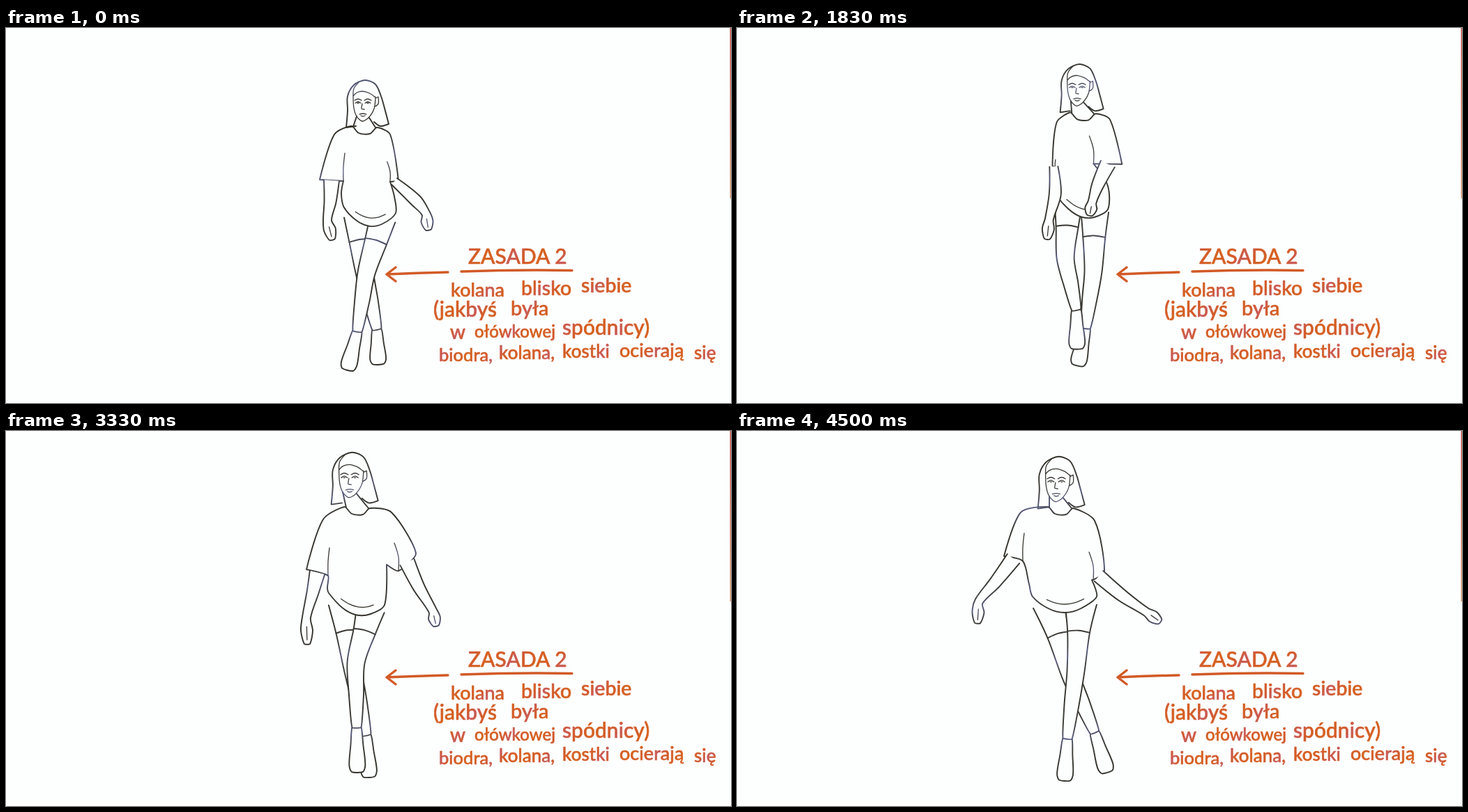
Animation, 1040 px wide and 539 px high, one loop 4670 ms. Source, as an HTML page:

```html
<!DOCTYPE html>
<html lang="pl">
<head>
<meta charset="utf-8">
<title>Zasada 2</title>
<style>
html, body { margin: 0; height: 100%; overflow: hidden; background: #fdfefe; }
svg { display: block; width: 100vw; height: 100vh; }
text { font-family: Lato, "Open Sans", sans-serif; font-weight: 500; fill: url(#ink); stroke: url(#ink); stroke-width: .6; }
path { fill: none; stroke-linecap: round; stroke-linejoin: round; }
#figure path { stroke: url(#pencil); stroke-width: 1.9; }
#figure .solid { fill: #fdfefe; }
#figure .thin { stroke-width: 1.3; }
</style>
</head>
<body>
<svg viewBox="0 0 1040 539">
  <defs>
    <linearGradient id="pencil" gradientUnits="userSpaceOnUse" x1="400" y1="60" x2="418" y2="112" spreadMethod="reflect">
      <stop offset="0" stop-color="#32322a"/><stop offset=".7" stop-color="#3d3d3a"/><stop offset="1" stop-color="#555a7c"/>
    </linearGradient>
    <linearGradient id="ink" gradientUnits="userSpaceOnUse" x1="620" y1="320" x2="645" y2="338" spreadMethod="reflect">
      <stop offset="0" stop-color="#d6611f"/><stop offset=".7" stop-color="#d25a2c"/><stop offset="1" stop-color="#c85a58"/>
    </linearGradient>
    <linearGradient id="edge" x2="0" y2="1">
      <stop offset="0" stop-color="#c8564e"/><stop offset="1" stop-color="#dca078"/>
    </linearGradient>
  </defs>
  <rect x="1038.5" width="1.5" height="245" fill="url(#edge)"/>
  <g id="figure"></g>
  <path d="M634 351Q590 352 546 354M559 344L546 354L559 364M653 350Q735 347 812 348.5" stroke="#d25a26" stroke-width="3.4"/>
  <g id="note"></g>
</svg>
<script>
const words = [
  ['ZASADA 2', 663, 339, 30],
  ['kolana', 638, 386, 27], ['blisko', 739, 384, 28.5], ['siebie', 825, 380, 28.5],
  ['(jakbyś', 613, 415, 30], ['była', 724, 413, 29],
  ['w', 637, 447, 28], ['ołówkowej', 672, 445, 24], ['spódnicy)', 798, 441, 30],
  ['biodra,', 621, 479, 25.5], ['kolana,', 707, 476, 26], ['kostki', 798, 474, 26],
  ['ocierają', 880, 473, 27], ['się', 987, 476, 26]
];
note.innerHTML = words.map(([s, x, y, size]) =>
  `<text x="${x}" y="${y}" font-size="${size}">${s}</text>`).join('');

// Joints as x,y pairs. Sleeves: outer and inner end. Arms: elbow, wrist, tip.
// Legs: knee, ankle, toe; A hangs on screen left, B on screen right.
const poses = [
  { step: 0, front: 'B', head: [512, 107, 1], neck: [514, 142], shoulders: [471, 153, 551, 153],
    sleeveL: [450, 218, 484, 220], sleeveR: [563, 220, 551, 221], waist: [481, 238, 557, 242], hem: [485, 258, 559, 266],
    armL: [465, 250, 461, 276, 468, 304], armR: [588, 248, 602, 266, 606, 290],
    legA: [515, 355, 532, 433, 534, 483], legB: [517, 352, 504, 436, 490, 491] },
  { step: 4, front: 'B', head: [498, 100, 1], neck: [502, 135], shoulders: [455, 140, 546, 152],
    sleeveL: [430, 206, 451, 210], sleeveR: [555, 213, 542, 222], waist: [462, 234, 540, 230], hem: [464, 250, 543, 247],
    armL: [430, 240, 413, 270, 414, 293], armR: [585, 228, 616, 232, 632, 250],
    legA: [501, 355, 518, 425, 531, 477], legB: [515, 345, 500, 434, 489, 487] },
  { step: 8, front: 'A', head: [488, 85, 1], neck: [492, 124], shoulders: [453, 128, 527, 138],
    sleeveL: [443, 196, 449, 198], sleeveR: [548, 206, 505, 205], waist: [450, 222, 515, 235], hem: [453, 239, 530, 257],
    armL: [446, 230, 438, 262, 435, 292], armR: [524, 230, 531, 250, 529, 267],
    legA: [457, 318, 468, 381, 469, 435], legB: [511, 350, 502, 430, 488, 483] },
  { step: 15, front: 'A', behind: 'L', head: [488, 84, 1.04], neck: [502, 120], shoulders: [466, 146, 545, 122],
    sleeveL: [465, 200, 466, 204], sleeveR: [558, 182, 520, 182], waist: [460, 215, 554, 215], hem: [461, 234, 535, 265],
    armL: [470, 250, 461, 292, 458, 318], armR: [508, 222, 481, 250, 475, 272],
    legA: [490, 348, 512, 437, 513, 495], legB: [511, 350, 498, 433, 490, 487] },
  { step: 20, front: 'B', head: [493, 66, 1.1], neck: [504, 110], shoulders: [455, 127, 553, 117],
    sleeveL: [431, 199, 462, 208], sleeveR: [588, 176, 563, 201], waist: [461, 226, 546, 192], hem: [463, 233, 543, 250],
    armL: [440, 232, 431, 268, 432, 306], armR: [592, 224, 612, 258, 617, 280],
    legA: [498, 345, 517, 437, 521, 497], legB: [502, 333, 503, 426, 504, 490] },
  { step: 24, front: 'B', behind: 'R', head: [478, 69, 1.1], neck: [486, 110], shoulders: [429, 121, 532, 122],
    sleeveL: [413, 195, 437, 201], sleeveR: [543, 195, 534, 201], waist: [448, 219, 536, 215], hem: [452, 233, 540, 238],
    armL: [419, 235, 412, 275, 417, 306], armR: [536, 235, 544, 275, 542, 307],
    legA: [492, 345, 523, 435, 526, 491], legB: [498, 337, 473, 441, 465, 503] },
  { step: 27, front: 'B', head: [458, 72, 1.1], neck: [464, 110], shoulders: [407, 117, 513, 129],
    sleeveL: [383, 180, 410, 187], sleeveR: [527, 203, 511, 214], waist: [419, 220, 509, 214], hem: [424, 238, 516, 238],
    armL: [370, 218, 347, 245, 345, 276], armR: [553, 237, 587, 260, 607, 274],
    legA: [480, 355, 513, 433, 531, 490], legB: [486, 345, 474, 442, 470, 502] }
];

// Head strokes around the point between the eyes.
const hair = [-10, 34, -24, 36, -22, 12, -22, -9, -13, -25, 3, -32, 18, -26, 26, -9, 32, 12, 37, 31, 25, 34, 16, 28];
const face = [
  [-14, -9, -13, 8, -9, 20, -1, 27, 8, 22, 16, 9, 18, -8],
  [-6, -29, -13, -20, -14, -9, -9, -14, 0, -16, 10, -13, 17, -8],
  [18, -6, 22, -8, 22, 2, 17, 6],
  [-1, 2, -2, 9, 2, 10],
  [-5, 17, 0, 16, 5, 17], [-3, 19, 0, 20, 3, 19]
];
for (const x of [-7, 7])
  face.push([x - 5, -3, x, -5, x + 5, -3], [x - 4, 1, x, -1, x + 4, 1], [x - 1, 1, x + 1, 1]);

const pairs = a => a.flatMap((x, i) => i % 2 ? [] : [[x, a[i + 1]]]);
const mix = (a, b, k) => a.map((v, i) => v + (b[i] - v) * k);
const shift = (a, x, y) => [a[0] + x, a[1] + y];
const dist = (a, b) => Math.hypot(b[0] - a[0], b[1] - a[1]);

// Smooth curve through points; sharp turns stay corners.
function curve(p, closed) {
  const n = p.length;
  const at = i => p[closed ? (i + n) % n : Math.min(n - 1, Math.max(0, i))];
  const tangent = i => {
    const [a, b, c] = [at(i - 1), at(i), at(i + 1)];
    const dot = (b[0] - a[0]) * (c[0] - b[0]) + (b[1] - a[1]) * (c[1] - b[1]);
    const cos = dot / (dist(a, b) * dist(b, c) || 1);
    const k = Math.sqrt(Math.max(0, cos)) / 3 / (dist(a, c) || 1);
    return [(c[0] - a[0]) * k, (c[1] - a[1]) * k];
  };
  let d = 'M' + p[0];
  for (let i = 0; i < (closed ? n : n - 1); i++) {
    const a = at(i), b = at(i + 1), ta = tangent(i), tb = tangent(i + 1), len = dist(a, b);
    d += `C${shift(a, ta[0] * len, ta[1] * len)} ${shift(b, -tb[0] * len, -tb[1] * len)} ${b}`;
  }
  return d;
}

const path = (d, type = '') => `<path class="${type}" d="${d}"/>`;

// Outline of a tapered limb: down one side, back up the other.
function limb(joints, widths) {
  const side = sign => joints.map((p, i) => {
    const a = joints[Math.max(0, i - 1)], b = joints[Math.min(joints.length - 1, i + 1)];
    const k = sign * widths[i] / (dist(a, b) || 1);
    return shift(p, (a[1] - b[1]) * k, (b[0] - a[0]) * k);
  });
  return [...side(1), ...side(-1).reverse()];
}

// Part of a sagging line between two points.
const sag = ([a, b], from, to, depth, lift = 0) => [0, .25, .5, .75, 1].map(s => {
  const u = from + (to - from) * s;
  return shift(mix(a, b, u), 0, 4 * depth * u * (1 - u) - lift);
});

function arm(pose, side) {
  const [outer, inner] = pairs(pose['sleeve' + side]);
  const [elbow, wrist, tip] = pairs(pose['arm' + side]);
  const top = Math.min(11, Math.max(6, dist(outer, inner) / 2));
  const joints = [mix(outer, inner, .5), elbow, wrist, mix(wrist, tip, .5), tip];
  return path(curve(limb(joints, [top, 8.5, 6, 8.5, 4])), 'solid') +
    path(curve([mix(wrist, tip, .35), mix(wrist, tip, .85)]), 'thin');
}

function leg(pose, side) {
  const hem = pairs(pose.hem), [knee, ankle, toe] = pairs(pose['leg' + side]);
  const hip = shift(mix(...hem, side === 'A' ? .25 : .75), 0, 10);
  const cuff = mix(hip, knee, .42);
  const outline = limb([hip, cuff, knee, mix(knee, ankle, .5), ankle], [dist(...hem) / 4, 16, 12.5, 10.5, 6.5]);
  const foot = limb([ankle, mix(ankle, toe, .4), mix(ankle, toe, .85), toe], [6.5, 9, 11.5, 8]);
  return path(curve(foot, true), 'solid') + path(curve(outline), 'solid') +
    path(curve([outline[1], shift(cuff, 0, -2), outline[8]]));
}

function shirt(pose) {
  const [outL, inL] = pairs(pose.sleeveL), [outR, inR] = pairs(pose.sleeveR);
  const [shoulderL, shoulderR] = pairs(pose.shoulders), [waistL, waistR] = pairs(pose.waist);
  const hem = pairs(pose.hem), at = (x, y) => shift(pose.neck, x, y);
  const outline = [at(-18, -1), shoulderL, outL, inL, waistL, ...sag(hem, 0, 1, 23),
    waistR, inR, outR, shoulderR, at(18, 1), at(8, 10), at(-8, 9)];
  const fold = (inner, outer, lean) => {
    const rise = Math.min(40, 2.4 * dist(inner, outer));
    return curve([inner, shift(inner, 0, -rise / 2), shift(inner, lean * rise, -rise)]);
  };
  return path(curve(outline, true), 'solid') +
    path(fold(inL, outL, .05) + fold(inR, outR, -.15) + curve(sag(hem, .22, .8, 21, 10)), 'thin');
}

function head(pose) {
  const [x, y, size] = pose.head;
  const place = a => pairs(a).map(p => [x + p[0] * size, y + p[1] * size]);
  const jaw = place([-9, 20, 9, 22]);
  const neck = `M${jaw[0]}L${shift(pose.neck, -16, 0)}M${jaw[1]}L${shift(pose.neck, 16, 1)}`;
  return path(neck + curve(place(hair))) + path(face.map(a => curve(place(a))).join(''), 'thin');
}

function blend(step) {
  const i = Math.max(0, poses.findIndex(p => p.step >= step) - 1);
  const a = poses[i], b = poses[i + 1], k = (step - a.step) / (b.step - a.step);
  const { front, behind } = k < .5 ? a : b;
  const pose = { front, behind };
  for (const key in a) if (Array.isArray(a[key])) pose[key] = mix(a[key], b[key], k);
  return pose;
}

function draw(step) {
  const pose = blend(step);
  const legs = pose.front === 'A' ? ['B', 'A'] : ['A', 'B'];
  const arms = behind => ['L', 'R'].filter(s => (s === pose.behind) === behind).map(s => arm(pose, s));
  figure.innerHTML = [...arms(true), ...legs.map(s => leg(pose, s)),
    shirt(pose), ...arms(false), head(pose)].join('');
}

const loop = 4670, steps = 28;
const start = performance.now();
let shown = -1;
function tick() {
  const t = (performance.now() - start) % loop;
  const step = Math.min(steps - 1, Math.floor((t + 5) * 6 / 1000));
  if (step !== shown) draw(shown = step);
  requestAnimationFrame(tick);
}
tick();
</script>
</body>
</html>
```
